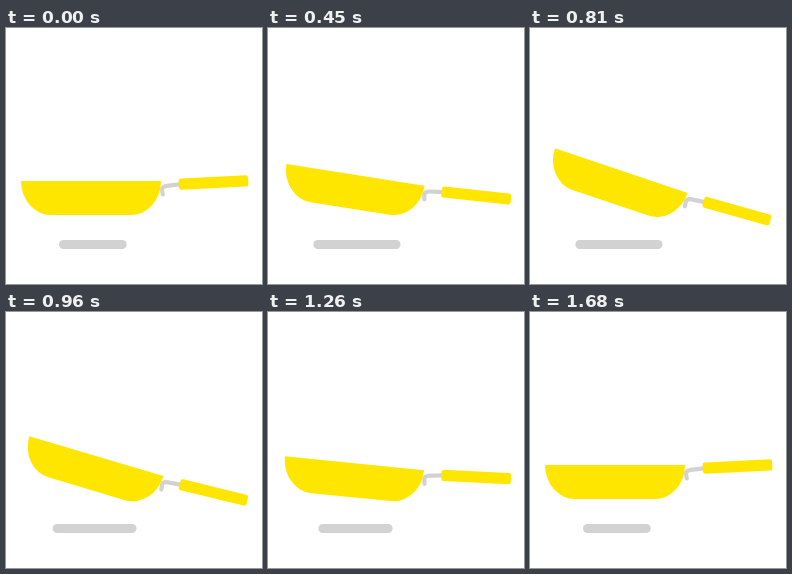
These frames come from a looping animation (256 by 256 pixels, 1.71 s). An HTML page with a canvas:

```html
<!DOCTYPE html>
<html lang="en">
<head>
<meta charset="utf-8">
<title>Pan toss</title>
<style>
html, body { margin: 0; width: 100%; height: 100%; overflow: hidden; background: #fff; }
canvas { display: block; width: 256px; height: 256px; }
</style>
</head>
<body>
<canvas id="stage" width="256" height="256"></canvas>
<script>
const LOOP = 1710, STEP = 30;
const YELLOW = '#ffe600', GREY = '#d2d2d2';
const PIVOT = [126, 166];

const canvas = document.getElementById('stage');
const ctx = canvas.getContext('2d');
const ratio = window.devicePixelRatio || 1;
canvas.width = canvas.height = 256 * ratio;

// Smooth curve through [time, value] points without overshoot.
function curve(points) {
  const n = points.length;
  const slope = i => (points[i + 1][1] - points[i][1]) / (points[i + 1][0] - points[i][0]);
  const tangent = points.map((p, i) => {
    if (i === 0 || i === n - 1) return 0;
    const a = slope(i - 1), b = slope(i);
    return a * b <= 0 ? 0 : 2 * a * b / (a + b);
  });
  return t => {
    let i = 0;
    while (i < n - 2 && t > points[i + 1][0]) i++;
    const [t0, v0] = points[i], [t1, v1] = points[i + 1];
    const d = t1 - t0, u = Math.min(1, Math.max(0, (t - t0) / d));
    const w = 1 - u;
    return v0 * (1 + 2 * u) * w * w + tangent[i] * d * u * w * w
         + v1 * u * u * (3 - 2 * u) - tangent[i + 1] * d * u * u * w;
  };
}

const tilt = curve([[0, 0], [210, 0.15], [330, 1.4], [435, 8], [540, 14.3], [600, 15.4],
  [810, 18.6], [850, 18.8], [1110, 10.8], [1410, 1.8], [1560, 0.35], [1680, 0]]);
const sink = curve([[0, 0], [330, 0.25], [600, 0], [810, 2], [1110, 2.4], [1410, 2], [1560, 0.6], [1680, 0]]);

function smooth(a, b, t) {
  const u = Math.min(1, Math.max(0, (t - a) / (b - a)));
  return u * u * (3 - 2 * u);
}

function pill(x, y, w, h, r, color) {
  ctx.fillStyle = color;
  ctx.beginPath();
  ctx.roundRect(x, y, w, h, r);
  ctx.fill();
}

function drawShadow(t) {
  const grow = smooth(0, 510, t) - smooth(700, 1600, t);
  const left = 53 - 8 * grow, right = 120.7 + 12.3 * grow;
  pill(left, 212, right - left, 9, 4.5, GREY);
}

function drawPan() {
  // bracket
  ctx.strokeStyle = GREY;
  ctx.lineWidth = 4.2;
  ctx.lineCap = 'round';
  ctx.beginPath();
  ctx.moveTo(175, 156.2);
  ctx.lineTo(161, 157.8);
  ctx.quadraticCurveTo(156, 158.4, 156, 162);
  ctx.lineTo(156.8, 166.5);
  ctx.stroke();

  // bowl
  ctx.fillStyle = YELLOW;
  ctx.beginPath();
  ctx.moveTo(15, 153);
  ctx.lineTo(155, 153);
  ctx.ellipse(125, 153, 30, 34, 0, 0, Math.PI / 2);
  ctx.lineTo(45, 187);
  ctx.ellipse(45, 153, 30, 34, 0, Math.PI / 2, Math.PI);
  ctx.fill();

  // handle
  ctx.save();
  ctx.translate(207.5, 154.5);
  ctx.rotate(-2.8 * Math.PI / 180);
  pill(-34.8, -5.6, 69.6, 11.2, 2.5, YELLOW);
  ctx.restore();
}

function draw(t) {
  ctx.setTransform(ratio, 0, 0, ratio, 0, 0);
  ctx.fillStyle = '#fff';
  ctx.fillRect(0, 0, 256, 256);
  drawShadow(t);
  ctx.translate(PIVOT[0], PIVOT[1] + sink(t));
  ctx.rotate(tilt(t) * Math.PI / 180);
  ctx.translate(-PIVOT[0], -PIVOT[1]);
  drawPan();
}

function tick(now) {
  draw(Math.floor((now % LOOP) / STEP) * STEP);
  requestAnimationFrame(tick);
}
draw(0);
requestAnimationFrame(tick);
</script>
</body>
</html>
```
